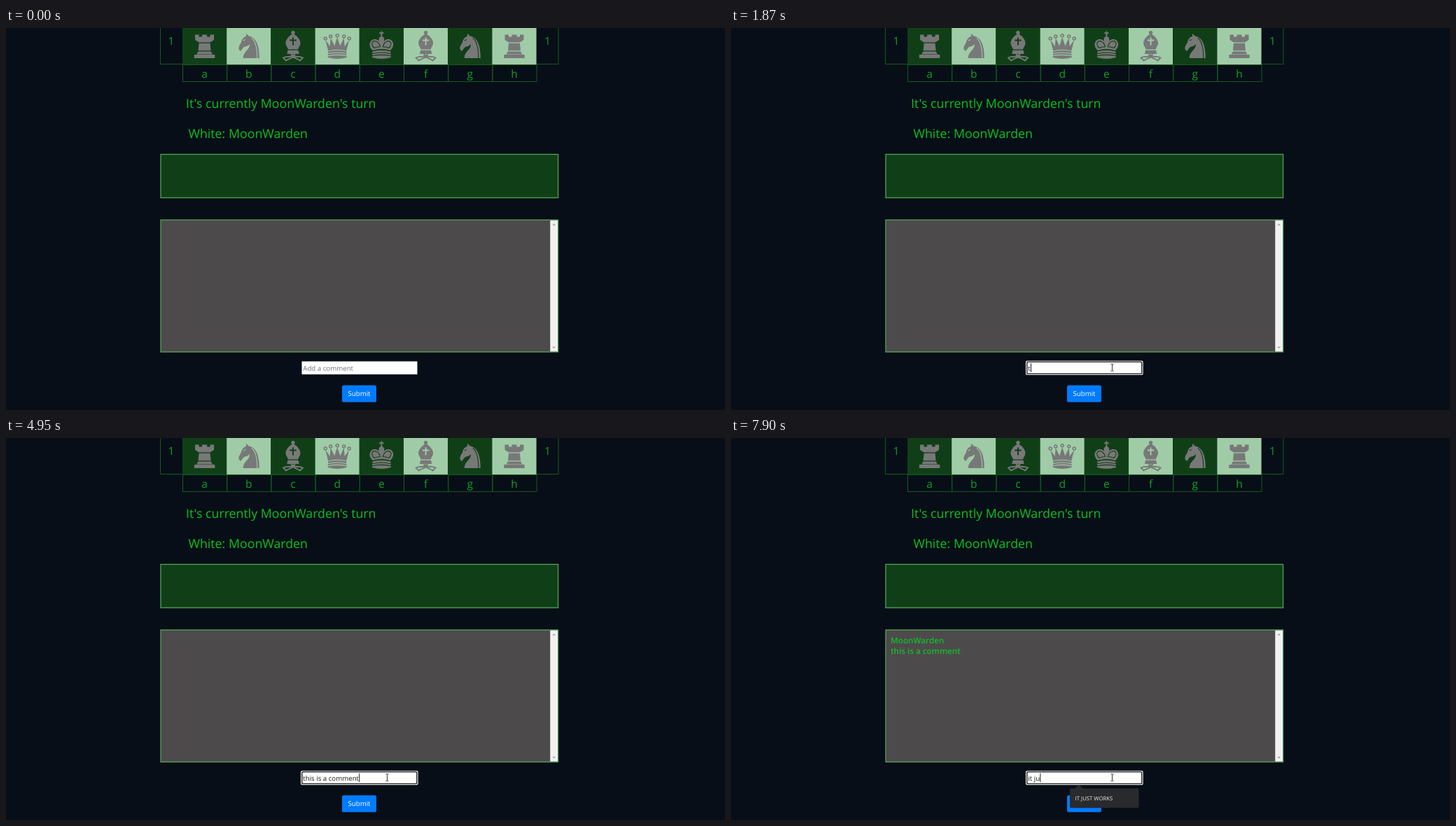
Recreate the animation shown at these times as an HTML page. Size 1027x545 px, loop 8000 ms.

```html
<!DOCTYPE html>
<html lang="en">
<head>
<meta charset="utf-8">
<title>Chess comments</title>
<style>
  html, body { margin: 0; width: 100%; height: 100%; overflow: hidden; background: #070e17; }
  svg { display: block; width: 1027px; height: 545px; }
  text { font-family: "Open Sans", "Noto Sans", sans-serif; white-space: pre; text-rendering: geometricPrecision; }
  .dark { --cell: #103f17; }
  .light { --cell: #9fcca7; }
  .cell { fill: var(--cell); }
  .piece { fill: #787878; }
  .cut { fill: none; stroke: var(--cell); stroke-width: 1.1; }
  .line { fill: none; stroke: #787878; stroke-width: 1.9; }
  .grid { fill: none; stroke: #125c20; }
  .label { fill: #0fa028; font-size: 15.6px; text-anchor: middle; }
  .title { fill: #06c41e; font-size: 17.77px; }
  .panel { stroke: #50a458; stroke-width: 1.3; }
  .comment { fill: #12bd2c; font-size: 11.7px; font-weight: 600; }
  .field { font-size: 9.7px; }
  .popup rect, .popup path { fill: #292a2d; }
  .popup text { fill: #f1f1f2; font-size: 7.75px; }
</style>
</head>
<body>
<svg viewBox="0 0 1027 545">
  <defs>
    <g id="rook">
      <path d="M-13.5 9.5h5.5v3h4.5v-3h7v3h4.5v-3h5.5v7.5l-5.5 3.5h-16l-5.5-3.5z"/>
      <path d="M-8 21.7h16l1 10.6h-18zM-9 33.5h18l2.5 4h-23zM-14.7 38h29.4v5h-29.4z"/>
    </g>
    <g id="knight">
      <path d="M-8 43C-8 33 2 31 1 23C-2 27-6 26-8 28L-11.5 33-14 31Q-15.5 27-11 21Q-10 14-4 12L-3.5 8 0 11.5Q15 14 15 43Z"/>
      <path class="cut" d="M4 14.5Q12 20 12 43M-8 18l3-1.5"/>
    </g>
    <g id="bishop">
      <circle cy="6.6" r="2.7"/>
      <path d="M0 8.5C-5 10-11 17-10.5 22-10 26-7.5 28-7 30.5h14C7.5 28 10 26 10.5 22 11 17 5 10 0 8.5zM-7.5 31.8h15l1.2 5.2h-17.4z"/>
      <path class="cut" d="M0 13.5v11M-4.7 17.5h9.4" style="stroke-width:1.9"/>
      <path class="line" d="M-3 37C4 44 8 39 14 42.5L10 46.5C6 43 3 44 0 41C-3 44-6 43-10 46.5L-14 42.5C-8 39-4 44 3 37"/>
    </g>
    <g id="base">
      <path d="M-13 33.5Q0 29.8 13 33.5L13.5 42Q0 45.8-13.5 42z"/>
      <path class="cut" d="M-13.5 36.7Q0 33.4 13.5 36.7M-13.5 39.8Q0 37 13.5 39.8"/>
    </g>
    <g id="queen">
      <path d="M-17 17L-13 32.7Q0 29 13 32.7L17 17 10.5 26 9.5 14 4 25.5 0 13-4 25.5-9.5 14-10.5 26z"/>
      <g class="line" style="stroke-width:1.5">
        <circle cx="-17" cy="15" r="2"/><circle cx="-9.5" cy="12" r="2"/><circle cy="10.7" r="2"/>
        <circle cx="9.5" cy="12" r="2"/><circle cx="17" cy="15" r="2"/>
      </g>
      <use href="#base"/>
    </g>
    <g id="king">
      <path class="line" d="M0 4.5v8M-3.2 7.3h6.4"/>
      <path d="M-12.5 32C-22 23-14 14-7 16.5-3 18-1 22 0 27 1 22 3 18 7 16.5 14 14 22 23 12.5 32Q0 28-12.5 32z"/>
      <path class="cut" d="M-10.5 28.5C-17 22-12 17.5-8 19-4 20.5-2.5 24-2 26.8Q-7 27-10.5 28.5zM10.5 28.5C17 22 12 17.5 8 19 4 20.5 2.5 24 2 26.8Q7 27 10.5 28.5z"/>
      <path d="M0 27C-7 16-3 12 0 12S7 16 0 27z"/>
      <use href="#base"/>
    </g>
  </defs>

  <rect width="1027" height="545" fill="#070e17"/>
  <g id="board"></g>
  <path class="grid" d="M220.5-1V51.5H252M758 51.5H789V-1"/>
  <text class="label" x="236" y="24">1</text>
  <text class="label" x="773.5" y="24">1</text>

  <text class="title" x="257" y="113.5">It's currently MoonWarden's turn</text>
  <text class="title" x="260.5" y="157.3">White: MoonWarden</text>
  <rect class="panel" x="221" y="180.3" width="567.6" height="61.9" fill="#103f17"/>
  <rect class="panel" x="221" y="273.8" width="567.6" height="188.4" fill="#4d4a4b"/>
  <rect x="777.3" y="274.5" width="10.7" height="187" fill="#f1f1f1"/>
  <path d="M780.3 281.5l2.4-2.6 2.4 2.6zM780.3 454.7l2.4 2.6 2.4-2.6z" fill="#a0a0a0"/>
  <g id="posted" class="comment">
    <text x="228" y="293.2">MoonWarden</text>
    <text x="228" y="308.3">this is a comment</text>
  </g>

  <rect x="422.5" y="475.6" width="165" height="18.6" fill="#fff"/>
  <g id="ring">
    <rect x="421" y="474.7" width="167.6" height="20.4" rx="2" fill="#fff"/>
    <rect x="422.8" y="476.4" width="164" height="17" rx="1" fill="#fff" stroke="#101010" stroke-width="1.3"/>
  </g>
  <text id="hint" class="field" x="424.3" y="488.7" fill="#6c757d">Add a comment</text>
  <text id="typed" class="field" x="424.3" y="488.7" fill="#1c1c1c"></text>
  <rect id="caret" y="478.3" width="0.9" height="12.6" fill="#000"/>

  <rect x="480" y="509.8" width="49" height="24" rx="2.6" fill="#007bff"/>
  <text class="field" x="504.5" y="525.3" fill="#fff" text-anchor="middle">Submit</text>

  <g id="popups"></g>
  <circle id="click" cx="543" cy="483.3" r="7.8" fill="#ffe24d" opacity=".92"/>
  <path id="beam" d="M542.4 479.3h1.4l.7.5.7-.5h1.4M544.5 479.8v9M542.4 489.3h1.4l.7-.5.7.5h1.4" fill="none" stroke="#222" stroke-width=".9"/>
  <path id="arrow" d="M0 0v11l2.6-2.4 1.8 4 1.6-.7-1.8-3.9h3.6z" fill="#fff" stroke="#000" stroke-width=".6"/>
</svg>
<script>
  const LOOP = 8000, BLINK = 530;
  const $ = id => document.getElementById(id);
  const show = (el, on) => el.setAttribute("visibility", on ? "visible" : "hidden");
  const within = (t, from, to) => t >= from && t < to;

  const ROW = ["rook", "knight", "bishop", "queen", "king", "bishop", "knight", "rook"];
  const CELL = 63.2, LEFT = 252;
  $("board").innerHTML = ROW.map((piece, i) => {
    const x = LEFT + i * CELL, mid = x + CELL / 2;
    return `<g class="${i % 2 ? "light" : "dark"}">
      <rect class="cell" x="${x}" y="0" width="${CELL}" height="52"/>
      <use class="piece" href="#${piece}" x="${mid}"/></g>
      <rect class="grid" x="${x + .5}" y="52.5" width="${CELL}" height="24"/>
      <text class="label" x="${mid}" y="71">${"abcdefgh"[i]}</text>`;
  }).join("");

  // Suggestion lists and the spans during which each is open
  const history = ["IT JUST WORKS", "a comment", "a third comment", "DONE", "1", "awesome stage"];
  const lists = [
    { items: history, above: true, spans: [[1200, 1870], [6060, 6910]] },
    { items: ["this is a comment", "this is a much longer comment"], width: 144, spans: [[1940, 2280]] },
    { items: ["this is a comment"], spans: [[2280, 4810]] },
    { items: ["IT JUST WORKS", "it works"], spans: [[6980, 7240]] },
    { items: ["IT JUST WORKS"], spans: [[7240, LOOP]] }
  ];
  $("popups").innerHTML = lists.map(({ items, above, width = 98.6 }) => {
    const top = above ? 327.4 : 500, height = items.length * 22.75 + 5;
    const tip = above ? "M490.5 468.5h13l-6.5 6z" : "M490.5 500.5h13l-6.5-5.5z";
    const rows = items.map((s, i) =>
      `<text x="491.6" y="${top + 17 + i * 22.75}">${s}</text>`).join("");
    return `<g class="popup"><rect x="484" y="${top}" width="${width}" height="${height}" rx="2"/>
      <path d="${tip}"/>${rows}</g>`;
  }).join("");
  const popups = [...$("popups").children];

  const entries = [
    { text: "this is a comment", end: 5000,
      keys: [1870, 2010, 2280, 2410, 2480, 2750, 2810, 3010, 3160, 3370, 3820, 3950, 4220, 4350, 4550, 4620, 4740] },
    { text: "it ju", end: LOOP, keys: [6910, 7240, 7370, 7700, 7900] }
  ];
  const FOCUS = 1140;
  const resets = [FOCUS, ...entries.flatMap(e => e.keys)];

  function typedAt(t) {
    const entry = entries.find(e => within(t, e.keys[0], e.end));
    return entry ? entry.text.slice(0, entry.keys.filter(k => k <= t).length) : "";
  }

  // Pointer glides in along a cubic curve, in short steps
  function pointerAt(t) {
    const u = Math.min(1, Math.floor((t - 130) / 67) / 11);
    const p = u * u * (3 - 2 * u), q = 1 - p;
    const curve = (a, b, c, d) => q * q * q * a + 3 * q * q * p * b + 3 * q * p * p * c + p * p * p * d;
    return [curve(894, 780, 600, 544), curve(526, 500, 450, 484)];
  }

  function render(t) {
    const text = typedAt(t);
    $("typed").textContent = text;
    show($("hint"), !text);
    show($("ring"), t >= FOCUS);
    show($("posted"), t >= 5000);

    const since = t - Math.max(...resets.filter(k => k <= t));
    show($("caret"), t >= FOCUS && since % (2 * BLINK) < BLINK);
    $("caret").setAttribute("x", 424.6 + (text ? $("typed").getComputedTextLength() : 0));

    lists.forEach((list, i) => show(popups[i], list.spans.some(([a, b]) => within(t, a, b))));
    show($("click"), within(t, FOCUS, 1340) || within(t, 6060, 6190));

    const [x, y] = pointerAt(t);
    const over = x < 587 && y > 475;
    show($("beam"), t >= 130 && over);
    show($("arrow"), t >= 130 && !over);
    $("beam").setAttribute("transform", `translate(${x - 544} ${y - 484})`);
    $("arrow").setAttribute("transform", `translate(${x} ${y})`);
  }

  const start = performance.now();
  function frame() {
    render((performance.now() - start) % LOOP);
    requestAnimationFrame(frame);
  }
  frame();
</script>
</body>
</html>
```
